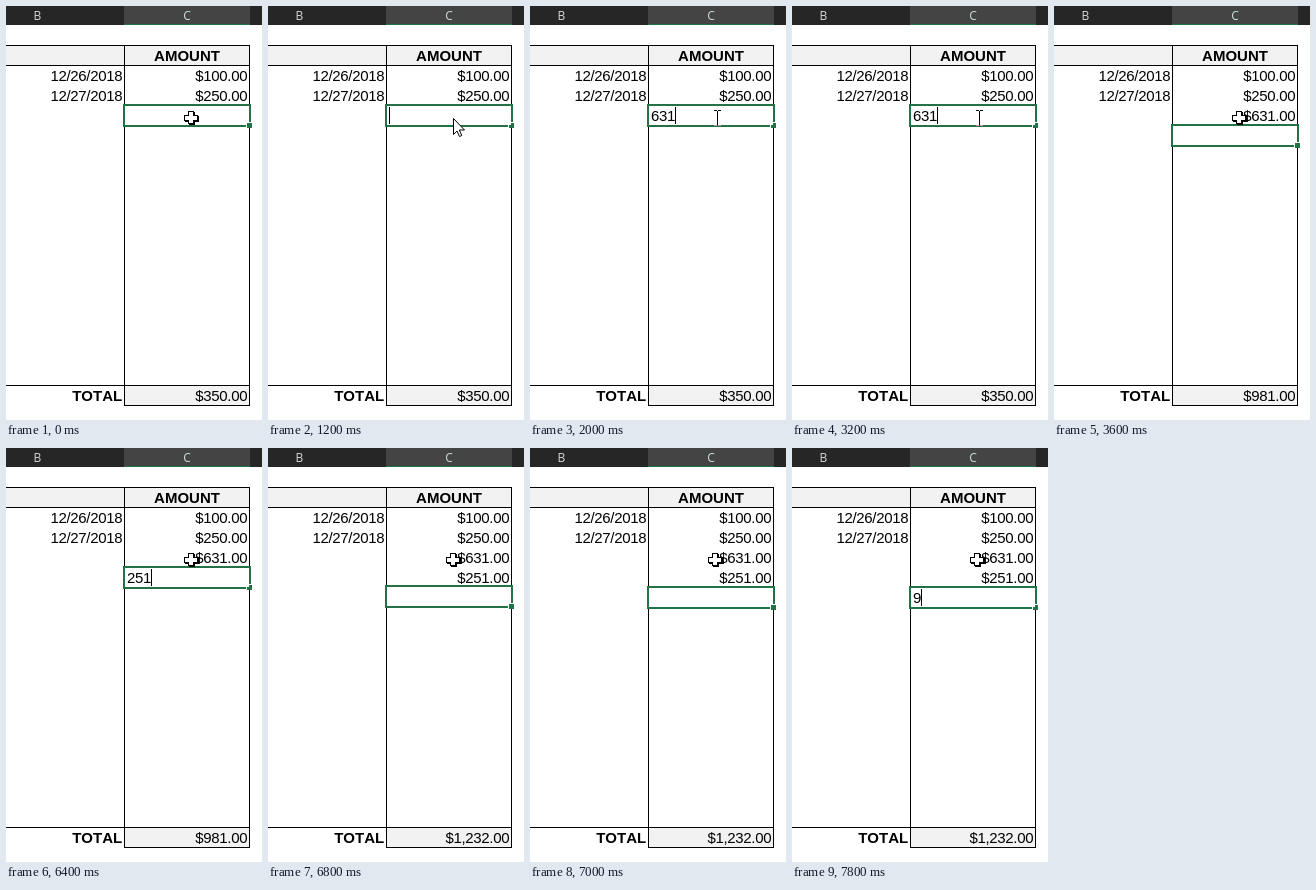
These frames come from a looping animation (256x414 px, 8 s). An HTML page:

```html
<!DOCTYPE html>
<html lang="en">
<head>
<meta charset="utf-8">
<title>Adding amounts</title>
<style>
  html, body { margin: 0; width: 100%; height: 100%; overflow: hidden; background: #fff; }
  svg { display: block; width: 256px; height: 414px; }
  text { font: 15px "Liberation Sans", Arial, sans-serif; font-kerning: none; letter-spacing: -.34px; white-space: pre; }
  .bold { font-weight: bold; letter-spacing: 0; }
  .end { text-anchor: end; }
  .mid { text-anchor: middle; }
  .column { font: 12px "Open Sans", "Noto Sans", sans-serif; letter-spacing: 0; text-anchor: middle; }
  rect, .crisp { shape-rendering: crispEdges; }
  .shade { fill: #f2f2f2; }
  .green { fill: #217346; }
  .white { fill: #fff; }
  #ibeam { fill: #fff; mix-blend-mode: difference; }
</style>
</head>
<body>
<svg viewBox="0 0 256 414">
  <rect class="white" width="256" height="414"/>

  <rect width="256" height="19" fill="#262626"/>
  <rect x="118" width="126" height="19" fill="#444"/>
  <rect class="green" x="118" y="18" width="126" height="1"/>
  <text class="column" x="31.5" y="14" fill="#d8d8d8">B</text>
  <text class="column" x="181" y="14" fill="#c9dcd1">C</text>

  <rect class="shade" y="40" width="243" height="19"/>
  <rect class="shade" x="119" y="380" width="124" height="19"/>
  <path class="crisp" fill="none" stroke="#000"
    d="M0 39.5H244M0 59.5H244M0 379.5H244M118 399.5H244M118.5 39V400M243.5 39V400"/>

  <text class="bold mid" x="181" y="55">AMOUNT</text>
  <text class="end" x="116.2" y="75">12/26/2018</text>
  <text class="end" x="116.2" y="95">12/27/2018</text>
  <text class="bold end" x="116.2" y="395">TOTAL</text>
  <g id="amounts"></g>
  <text id="total" class="end" x="241.2" y="395"></text>

  <g id="selection">
    <rect class="white" x="117" y="98" width="128" height="23"/>
    <path class="green crisp" fill-rule="evenodd" d="M117 98H245V121H117ZM119 100V119H243V100Z"/>
    <path class="white crisp" d="M240 116H246V122H240Z"/>
    <path class="green crisp" d="M241 117H246V122H241Z"/>
    <g id="editor">
      <rect class="white" x="119" y="100" width="124" height="19"/>
      <text id="entry" x="121" y="115"></text>
      <rect id="caret" y="101" width="1" height="17"/>
    </g>
  </g>

  <g id="cross" class="crisp">
    <path id="plus" d="M183 106H189V110H193V116H189V119H183V116H179V110H183Z"/>
    <path d="M182 105H188V109H192V115H188V118H182V115H178V109H182Z"/>
    <path class="white" d="M183 106H187V110H191V114H187V117H183V114H179V110H183Z"/>
  </g>
  <path id="arrow" class="white" stroke="#000" d="M185.5 112.5V128.5L189 125L191.5 130.5L193.8 129.5L191.3 124H196.5Z"/>
  <path id="ibeam" class="crisp" d="M184 104H187V105H188V104H191V105H188V119H191V120H188V119H187V120H184V119H187V105H184Z"/>
</svg>
<script>
  const LOOP = 8000;
  const ROW = 20;
  const DIGIT = 8;
  const committed = [100, 250, 631, 251];

  // time, filled rows, entry (null = not editing), caret shown, pointer, selection offset
  const steps = [
    [0,    2, null,  false, "cross", 0],
    [1200, 2, "",    true,  "arrow", 0],
    [1400, 2, "6",   true,  "ibeam", 0],
    [1600, 2, "63",  true,  "ibeam", 0],
    [2000, 2, "631", true,  "ibeam", 0],
    [2200, 2, "631", false, "ibeam", 0],
    [2600, 2, "631", true,  "ibeam", 0],
    [2800, 2, "631", false, "ibeam", 0],
    [3200, 2, "631", true,  "ibeam", 0],
    [3600, 3, null,  false, "cross", 0],
    [5400, 3, "2",   true,  "cross", 0],
    [5800, 3, "25",  true,  "cross", 0],
    [6000, 3, "25",  false, "cross", 0],
    [6200, 3, "251", false, "cross", 0],
    [6400, 3, "251", true,  "cross", 0],
    [6800, 4, null,  false, "cross", -1],
    [7000, 4, null,  false, "cross", 0],
    [7800, 4, "9",   true,  "cross", 0]
  ];

  const el = id => document.getElementById(id);
  const show = (id, on) => { el(id).style.display = on ? "" : "none"; };
  const money = n => "$" + n.toLocaleString("en-US", { minimumFractionDigits: 2 });

  const amountCells = committed.map((value, i) => {
    const cell = document.createElementNS("http://www.w3.org/2000/svg", "text");
    cell.setAttribute("class", "end");
    cell.setAttribute("x", 241.2);
    cell.setAttribute("y", 75 + i * ROW);
    cell.textContent = money(value);
    el("amounts").append(cell);
    return cell;
  });

  function render([, filled, entry, caret, pointer, offset]) {
    amountCells.forEach((cell, i) => { cell.style.display = i < filled ? "" : "none"; });
    el("total").textContent = money(committed.slice(0, filled).reduce((a, b) => a + b, 0));
    el("selection").setAttribute("transform", `translate(0 ${(filled - 2) * ROW + offset})`);
    show("editor", entry !== null);
    el("entry").textContent = entry || "";
    el("caret").setAttribute("x", 121 + DIGIT * (entry || "").length);
    show("caret", caret);
    for (const id of ["cross", "arrow", "ibeam"]) show(id, id === pointer);
  }

  const start = performance.now();
  let current;
  function tick() {
    const time = (performance.now() - start) % LOOP;
    const step = steps.findLast(s => s[0] <= time) || steps[0];
    if (step !== current) render(current = step);
    requestAnimationFrame(tick);
  }
  tick();
</script>
</body>
</html>
```
